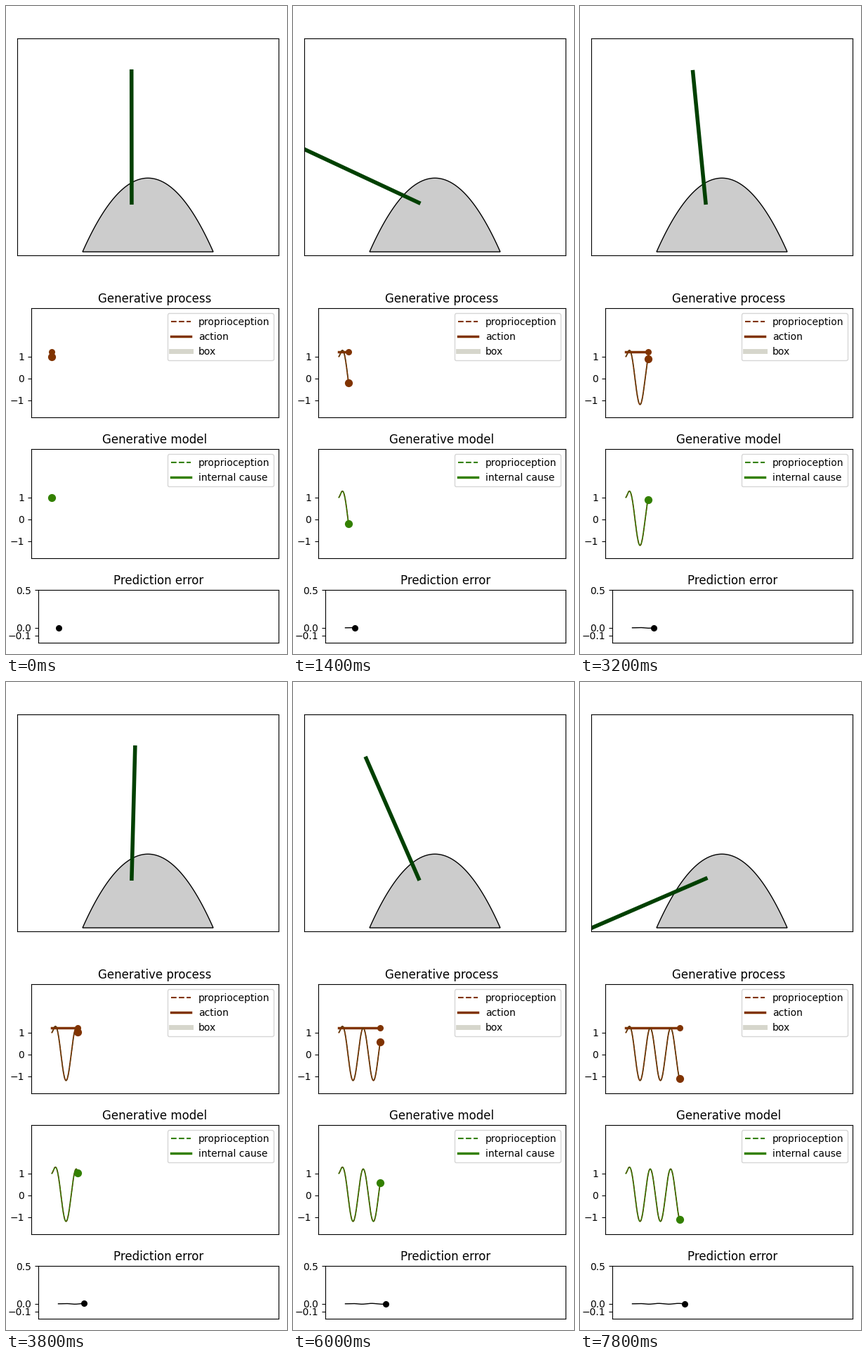
Recreate the animation shown at these times as a matplotlib script. Size 400 px wide and 920 px high, loop 8000 ms.

```python
import numpy as np
import matplotlib.pyplot as plt
from matplotlib.animation import FuncAnimation
from matplotlib.lines import Line2D
from matplotlib.patches import Polygon

W, H = 400, 920
FRAMES, STEP_MS = 40, 200
TOTAL = 150            # steps across the full time axis
FINE = 20              # curve samples per step
BROWN, GREEN, ARM = (0.5, 0.2, 0), (0.2, 0.5, 0), (0, 0.25, 0)
BOX = (0.84, 0.84, 0.8)
BASE, REACH = np.array([178.9, 279.2]), 186.4
OMEGA = 0.4234

plt.rcParams["font.family"] = "DejaVu Sans"
# The small surplus keeps the pixel size from rounding down.
fig = plt.figure(figsize=((W + 0.01) / 100, (H + 0.01) / 100), dpi=100, facecolor="white")


def panel(left, top, right, bottom):
    """Axes placed by pixel edges, measured from the top left."""
    return fig.add_axes([left / W, 1 - bottom / H, (right - left) / W, (bottom - top) / H])


def time_panel(left, top, bottom, title, ylim, ticks):
    ax = panel(left, top, 388, bottom)
    ax.set_title(title)
    ax.set_xlim(-0.1 * TOTAL, 1.1 * TOTAL)
    ax.set_ylim(*ylim)
    ax.set_xticks([])
    ax.set_yticks(ticks)
    return ax


def add_legend(ax, rows):
    handles = [Line2D([], [], color=c, lw=lw, ls=ls) for _, c, lw, ls in rows]
    ax.legend(handles, [row[0] for row in rows], loc="upper right")


def line(ax, **style):
    return ax.plot([], [], **style)[0]


def dot(ax, color, size):
    return ax.scatter([0], [0], s=size, color=[color], zorder=3)


def sensed(n):
    """Oscillation after a short starting transient."""
    return 1.2 * np.cos(OMEGA * n - 7.502) + 0.585 * np.exp(-n / 1.4)


def error(n):
    return -0.005 * np.cos(OMEGA * (n - 12.3)) * np.clip(n / 10, 0, 1)


# Arm and box
scene = panel(16, 46.4, 388, 354)
scene.set_xlim(16, 388)
scene.set_ylim(354, 46.4)
scene.set_xticks([])
scene.set_yticks([])
u = np.linspace(-1, 1, 100)
scene.add_patch(Polygon(np.column_stack([202 + 93 * u, 244.3 + 104.7 * u**2]),
                        closed=True, facecolor="0.8", edgecolor="black", lw=1))
arm = line(scene, color=ARM, lw=4)

# Generative process
process = time_panel(36, 429.4, 584.4, "Generative process", (-1.8, 3.2), [-1, 0, 1])
add_legend(process, [("proprioception", BROWN, 1.5, "--"),
                     ("action", BROWN, 2.5, "-"),
                     ("box", BOX, 5, "-")])
action = line(process, color=BROWN, lw=2.5)

# Generative model
model = time_panel(36, 629.4, 784.4, "Generative model", (-1.8, 3.2), [-1, 0, 1])
add_legend(model, [("proprioception", GREEN, 1.5, "--"),
                   ("internal cause", GREEN, 2.5, "-")])

curves = [line(process, color=BROWN, lw=1.3),
          line(process, color=(0.25, 0.25, 0.1), lw=1, ls="--", alpha=0.6),
          line(model, color=GREEN, lw=1.3),
          line(model, color=(0.4, 0.2, 0.05), lw=1, ls="--", alpha=0.6)]
heads = [dot(process, BROWN, 50), dot(model, GREEN, 50)]
action_head = dot(process, BROWN, 30)

# Prediction error
errors = time_panel(46, 829, 904.3, "Prediction error", (-0.2, 0.5), [-0.1, 0, 0.5])
error_line = line(errors, color="black", lw=1)
error_head = dot(errors, "black", 30)


def update(k):
    n = np.linspace(0, k, k * FINE + 1)
    value = sensed(n)
    now = value[-1]

    turn = 0.3 * np.pi * (now - 1)
    tip = BASE + REACH * np.array([np.sin(turn), -np.cos(turn)])
    arm.set_data([BASE[0], tip[0]], [BASE[1], tip[1]])

    for curve in curves:
        curve.set_data(n, value)
    for head in heads:
        head.set_offsets([[k, now]])

    action.set_data([0, k], [1.2, 1.2])
    action_head.set_offsets([[k, 1.2]])
    error_line.set_data(n, error(n))
    error_head.set_offsets([[k, error(k)]])
    return [arm, action, action_head, error_line, error_head, *curves, *heads]


anim = FuncAnimation(fig, update, frames=FRAMES, interval=STEP_MS,
                     repeat=True, repeat_delay=0, blit=False)
plt.show()
```
